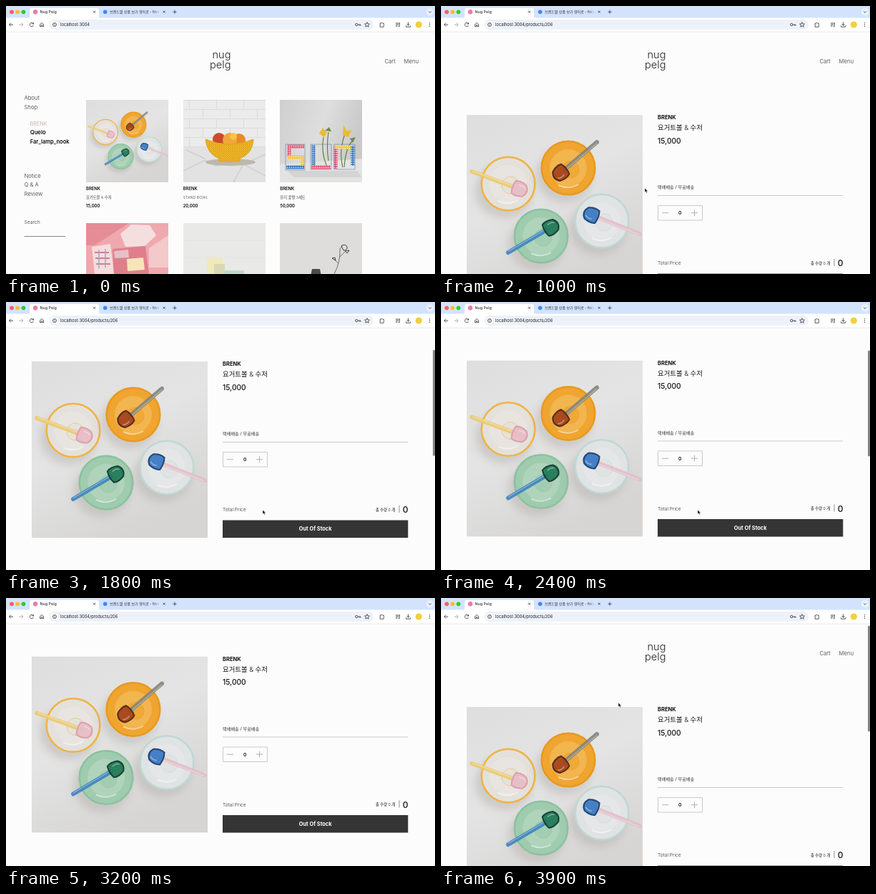
Animation of 600 by 374 pixels, one loop 4000 ms. Source, as an HTML page:

```html
<!DOCTYPE html>
<html lang="ko">
<head>
<meta charset="utf-8">
<style>
html, body { margin: 0; width: 100%; height: 100%; overflow: hidden; background: #fcfcfc; }
svg#stage { display: block; width: 600px; height: 374px; }
text { font-family: Inter, "Noto Sans CJK KR", "Noto Sans CJK", sans-serif; fill: #111; }
.logo { font-size: 14.6px; font-weight: 300; text-anchor: end; fill: #222; }
.nav { font-size: 7.7px; font-weight: 300; fill: #333; }
.b { font-weight: 600; }
.sub { font-size: 5.3px; font-weight: 300; fill: #444; }
.card { font-size: 5.9px; font-weight: 600; }
.icon * { fill: none; stroke: #444; stroke-width: .9; }
.icon .solid { fill: #444; stroke: none; }
.line { fill: none; stroke: #c4c4c4; stroke-width: .9; }
</style>
</head>
<body>
<svg id="stage" viewBox="0 0 600 374">
  <defs>
    <linearGradient id="paper" x1="0" y1="0" x2=".5" y2="1">
      <stop stop-color="#dededf"/><stop offset=".5" stop-color="#e4e4e4"/><stop offset="1" stop-color="#d6d5d4"/>
    </linearGradient>
    <linearGradient id="wall" x2="1" y2=".3">
      <stop stop-color="#cfcfcf"/><stop offset=".55" stop-color="#dedede"/><stop offset="1" stop-color="#c9c9c9"/>
    </linearGradient>
    <linearGradient id="fade">
      <stop offset=".88" stop-color="#d3e3fd" stop-opacity="0"/><stop offset="1" stop-color="#d3e3fd"/>
    </linearGradient>
    <pattern id="tiles" width="38" height="26" patternUnits="userSpaceOnUse">
      <path d="M0 .5h38M0 13.5h38M8.5 0v13M27.5 13v13" stroke="#d5d5d5" stroke-width=".7"/>
    </pattern>
    <pattern id="mesh" width="3" height="3" patternUnits="userSpaceOnUse">
      <path d="M0 0l3 3M3 0l-3 3" stroke="#d99b12" stroke-width=".7"/>
    </pattern>
    <pattern id="dots" width="3" height="3" patternUnits="userSpaceOnUse">
      <circle cx="1.5" cy="1.5" r=".8" fill="#f4f4f4"/>
    </pattern>
    <filter id="soft" x="-30%" y="-30%" width="160%" height="160%"><feGaussianBlur stdDeviation="6"/></filter>
    <clipPath id="square"><path d="M0 0h246v246H0z"/></clipPath>
    <clipPath id="tile"><path d="M0 0h115v115H0z"/></clipPath>
    <g id="bowls" clip-path="url(#square)"><path d="M0 0h246v246H0z" fill="url(#paper)"/></g>
  </defs>

  <rect width="600" height="374" fill="#fcfcfc"/>

  <g id="page">
    <text class="logo" x="314.5" y="72.5">nug</text>
    <text class="logo" x="314.5" y="86.5">pelg</text>
    <text class="nav" x="529.5" y="79.5">Cart</text>
    <text class="nav" x="556.5" y="79.5">Menu</text>

    <g id="home">
      <g class="nav">
        <text class="nav" x="25.5" y="131">About</text>
        <text class="nav" x="25.5" y="143.5">Shop</text>
        <text x="33.7" y="166.5" style="fill:#b3a19d;font-size:7.2px">BRENK</text>
        <text class="b" x="33.7" y="179">Quelo</text>
        <text class="b" x="33.7" y="191.7" style="font-size:7.5px">Far_lamp_nook</text>
        <text class="nav" x="25.5" y="239.7">Notice</text>
        <text class="nav" x="25.5" y="252.2">Q &amp; A</text>
        <text class="nav" x="25.5" y="265">Review</text>
        <text x="25.5" y="303.7" style="font-size:6.8px;fill:#333">Search</text>
      </g>
      <path d="M25.5 321.5H83" stroke="#888"/>
      <use href="#bowls" transform="translate(112 131) scale(.4675)"/>

      <g transform="translate(248 131)" clip-path="url(#tile)">
        <path d="M0 0h115v115H0z" fill="#ebebeb"/>
        <path d="M0 0h115v66H0z" fill="url(#tiles)"/>
        <path d="M0 66h115v49H0z" fill="#e2e2e2"/>
        <path d="M0 99l30-15 16 8 30-6 39 20M4 70l26 12M70 115l14-25 31-14" fill="none" stroke="#cdcdcd" stroke-width="1.4"/>
        <ellipse cx="66" cy="87" rx="35" ry="5" fill="#bcb8ae"/>
        <circle cx="50" cy="55" r="9" fill="#c94a2d"/>
        <circle cx="78" cy="56" r="9" fill="#e88a26"/>
        <circle cx="65" cy="56" r="10" fill="#f1a637"/>
        <circle cx="70" cy="51" r="5" fill="#f4c64c"/>
        <path id="basket" d="M31 55q34 14 67 0q-1 20-19 27v4H50v-4Q33 75 31 55z" fill="#f2bd2e" opacity=".9"/>
        <use href="#basket" style="fill:url(#mesh)"/>
        <path d="M31 55q34 14 67 0q-1 20-19 27v4H50v-4Q33 75 31 55z" fill="url(#mesh)" stroke="#dfa51c"/>
      </g>

      <g transform="translate(383 131)" clip-path="url(#tile)">
        <path d="M0 0h115v115H0z" fill="url(#wall)"/>
        <path d="M0 90l115-8v33H0z" fill="#e4e3e2"/>
        <path d="M10 99h98l7 9H20z" fill="#cbcbcd" opacity=".6"/>
        <g fill="none" stroke="#5d7a3e" stroke-width="1.1">
          <path d="M61 52q-4 20 5 42M68 45q-3 20 0 40M92 45q-10 25-4 49M101 58q-9 9-11 36"/>
        </g>
        <path d="M55 47l5-8 6 7-4 6zM89 35l4 8 7-1-4 10-8-3z" fill="#e9bd34"/>
        <path d="M63 43l6-5 3 6zM98 54l8-2-4 8z" fill="#728a4b"/>
        <g fill="none" stroke-width="5">
          <path d="M34 65H13v14" stroke="#ea5d7d"/>
          <path d="M11 80h21v16" stroke="#efc83d"/>
          <path d="M34 94H9" stroke="#3b7fc5"/>
          <path d="M47 63v30" stroke="#4c83c2"/><path d="M44 94h27" stroke="#ea5d72"/>
          <path d="M78 96V65" stroke="#e85474"/><path d="M76 66h26" stroke="#edc63e"/>
          <path d="M102 64v28" stroke="#3f7ec1"/>
          <path stroke="url(#dots)" d="M34 65H13v14M11 80h21v16M34 94H9M47 63v30M44 94h27M78 96V65M76 66h26M102 64v28"/>
        </g>
        <path d="M8 62h27v36H8zM43 62h29v35H43zM76 62h29v35H76z" fill="none" stroke="#446d9e" stroke-width=".5"/>
      </g>

      <g transform="translate(112 303)" clip-path="url(#tile)">
        <path d="M0 0h115v115H0z" fill="#efa9ae"/>
        <path d="M0 0h60L12 31H0z" fill="#e58d97"/>
        <path d="M48 15l15-13 26 1 9 14-16 15-27 1z" fill="#f5dfde"/>
        <path d="M88 35l27-18v45H88z" fill="#f3c9ca"/>
        <path d="M8 33l26-4 5 42H12z" fill="#f6dcdc"/>
        <path d="M37 36l46-4 5 39H39z" fill="#df7f8c"/>
        <path d="M39 39l20-2 1 11-20 1z" fill="#e6c0c8"/>
        <path d="M57 50l23-2 2 17-24 2z" fill="#f6e5ba"/>
        <path d="M12 41h20M13 49h20M14 57h20" stroke="#ce8090" stroke-width="2"/>
        <path d="M18 37v26M27 36v26" stroke="#98a9c4" stroke-width="1.5"/>
      </g>

      <g transform="translate(248 303)" clip-path="url(#tile)">
        <path d="M0 0h115v115H0z" fill="#e9e9e8"/>
        <path d="M0 24h115M0 48h115" stroke="#e3e3e2"/>
        <path d="M33 48h22v26H33z" fill="#eeeaba"/>
        <path d="M43 57h15v17H43z" fill="#d8d9b4"/>
        <path d="M58 66h27v8H58z" fill="#bfd8cb"/>
      </g>

      <g transform="translate(383 303)" clip-path="url(#tile)">
        <path d="M0 0h115v115H0z" fill="#dfdddb"/>
        <path d="M76 71q9-17 8-35M84 47l8-8M82 56l-7-6M84 36l4-5" fill="none" stroke="#555" stroke-width=".8"/>
        <path d="M86 32q5-4 8 1q1 5-5 5zM91 39l6-1-3 4zM73 49l4-1 1 4z" fill="none" stroke="#333" stroke-width=".9"/>
        <path d="M45 64h11l2 10H43z" fill="#4d4946"/>
      </g>
      <g id="labels"></g>
    </g>

    <g id="product">
      <use href="#bowls" x="36" y="152"/>
      <text x="303" y="158" style="font-size:7.5px;font-weight:700">BRENK</text>
      <text x="303" y="173.2" style="font-size:9.4px;font-weight:300">요거트볼 &amp; 수저</text>
      <text x="303" y="191.8" style="font-size:10.2px;font-weight:500">15,000</text>
      <text x="303" y="255.3" style="font-size:6.2px;fill:#333">택배배송 / 무료배송</text>
      <path class="line" d="M303 264.5h259M303.5 278.5h62v20.5h-62z"/>
      <path class="line" d="M309 288.7h9M350 288.7h9M354.5 284.2v9" style="stroke:#aaa"/>
      <text class="b" x="334.3" y="291" text-anchor="middle" style="font-size:6.6px">0</text>
      <text x="303" y="361" style="font-size:6.5px;fill:#555">Total Price</text>
      <text x="517" y="360.7" style="font-size:5.3px;font-weight:500">총 수량 <tspan font-weight="300">0</tspan> 개</text>
      <path d="M550 353v10" stroke="#777" stroke-width=".8"/>
      <text x="558.7" y="363.2" text-anchor="middle" style="font-size:12px;font-weight:500">0</text>
      <path d="M303 373.5h259.3V398H303z" fill="#353535"/>
      <text x="432.6" y="388.3" text-anchor="middle" style="font-size:7.4px;font-weight:700;fill:#fff">Out Of Stock</text>
    </g>
  </g>

  <rect id="thumb" x="597" width="3" height="148" rx="1.5" fill="#858585"/>

  <g id="browser">
    <path d="M0 0h600v17H0z" fill="#d3e3fd"/>
    <path d="M0 16.5h600V36H0z" fill="#fff"/>
    <path d="M0 36h600" stroke="#e3e6ea" stroke-width=".8"/>
    <circle cx="8" cy="8.3" r="2.9" fill="#fb5f57"/>
    <circle cx="16.2" cy="8.3" r="2.9" fill="#fdbc2e"/>
    <circle cx="24.4" cy="8.3" r="2.9" fill="#28c840"/>
    <path d="M30 17q3 0 3-3V6q0-3 3-3h91q3 0 3 3v8q0 3 3 3z" fill="#fff"/>
    <circle cx="41" cy="8.2" r="3.2" fill="#ea7ba5"/>
    <text x="47.5" y="10.2" style="font-size:5.4px">Nug Pelg</text>
    <circle cx="138.7" cy="8.2" r="2.8" fill="#4285f4"/>
    <text x="145" y="10.2" style="font-size:5px;fill:#333">브랜드별 상품 보기 영어로 - Nim</text>
    <path d="M145 3h70v11h-70z" fill="url(#fade)"/>
    <path d="M215 3h4v11h-4z" fill="#d3e3fd"/>
    <rect x="60.5" y="19" width="453.5" height="14" rx="7" fill="#edf1f9"/>
    <circle cx="68" cy="26" r="5.2" fill="#fff"/>
    <circle cx="593" cy="8.3" r="5.2" fill="#e9f0fe"/>
    <text id="address" x="76" y="28.1" style="font-size:5.8px;fill:#222"></text>
    <g class="icon">
      <path d="M122 6.7l3 3m0-3l-3 3M219.7 6.7l3 3m0-3l-3 3M233.5 8.3h5M236 5.8v5M591.2 7.5l1.8 1.8 1.8-1.8"/>
      <path d="M10 26H4.5m2.5-2.5L4.5 26l2.5 2.5"/>
      <path d="M18.5 26H24m-2.5-2.5L24 26l-2.5 2.5" style="stroke:#aaa"/>
      <path d="M38 24.5a2.6 2.6 0 1 0 .4 2.4M38.4 23v2h-2"/>
      <path d="M47.6 25.7v3.1h1.7v-2h1.6v2h1.7v-3.1l-2.5-2.2z"/>
      <circle cx="68" cy="26" r="2.5"/><path d="M68 25.6v1.8M68 24.2v.7"/>
      <circle cx="490.3" cy="26" r="1.7"/><path d="M492 26h4v1.7m-1.6-1.7v1.4"/>
      <path d="M505 22.7l1 2.2 2.4.2-1.8 1.6.5 2.4-2.1-1.3-2.1 1.3.5-2.4-1.8-1.6 2.4-.2z"/>
      <path d="M523.2 24.1h1.6q.9-2 1.8 0h1.6v1.6q1.8.8 0 1.6v1.9h-5z"/>
      <path d="M545 24h6M545 26h4M545 28h2.5M550.3 24v4.4h-1.6"/>
      <path d="M562.5 22.5v4.7m-2-2l2 2 2-2M559.5 27.4v1.8h6v-1.8"/>
      <circle class="solid" cx="592.5" cy="23.6" r=".7"/><circle class="solid" cx="592.5" cy="26" r=".7"/><circle class="solid" cx="592.5" cy="28.4" r=".7"/>
    </g>
    <circle cx="577.3" cy="26" r="4.6" fill="#f3cf3c"/>
  </g>

  <path id="cursor" d="M0 0v6l1.4-1.2 1 2.2 1.1-.5-1-2.1h1.9z" fill="#111" stroke="#fff" stroke-width=".5"/>
</svg>
<script>
const $ = id => document.getElementById(id);

// x, y, glass, centre, rim
const bowls = [
  [58, 96, '#e4e1dc', '#eae6e3', '#efb443'],
  [142, 74, '#efa52f', '#f3b958', '#e9991f'],
  [104, 169, '#9fcbae', '#b3d6be', '#8bc19f'],
  [189, 148, '#dfe3e3', '#e7e8ea', '#bfd8d2']
];
// handle tip x, y, head x, y, handle, head, outline
const spoons = [
  [7, 79, 75, 104, '#ecca72', '#e8bcc6', '#dc9bab'],
  [182, 38, 130, 82, '#85857a', '#a5431c', '#4a2418'],
  [58, 192, 119, 156, '#3d83bf', '#1f7a56', '#12352f'],
  [242, 166, 173, 139, '#e3bfc7', '#3a78c3', '#163a6b']
];

const drawBowl = ([x, y, glass, centre, rim]) => `
  <ellipse cx="${x - 6}" cy="${y + 11}" rx="40" ry="37" fill="#aaa69f" opacity=".4" filter="url(#soft)"/>
  <circle cx="${x}" cy="${y}" r="37.3" fill="${glass}" stroke="${rim}" stroke-width="2.6"/>
  <circle cx="${x}" cy="${y}" r="26" fill="${centre}" opacity=".8"/>
  <circle cx="${x + 3}" cy="${y + 2}" r="12" fill="${glass}" stroke="${rim}" stroke-width=".8" opacity=".7"/>
  <path d="M${x - 14} ${y + 24}q14 7 28-1" fill="none" stroke="#fff" stroke-width="2" opacity=".5"/>`;

const drawSpoon = ([x, y, hx, hy, handle, head, edge]) => {
  const angle = Math.atan2(hy - y, hx - x) * 180 / Math.PI;
  const reach = Math.hypot(hx - x, hy - y);
  return `<g transform="translate(${x} ${y}) rotate(${angle})">
    <path d="M0 0H${reach - 9}" stroke="${handle}" stroke-width="6" stroke-linecap="round" opacity=".9"/>
    <path d="M1 -1.2H${reach - 10}" stroke="#fff" stroke-width="1" opacity=".4"/>
    <path d="M${reach - 10} -9q-3 9 0 18q7 3 16-1q7-8 0-16q-9-4-16-1z" fill="${head}" stroke="${edge}" stroke-width="2" opacity=".93"/>
    <path d="M${reach - 4} -5q6-2 10 2" fill="none" stroke="#fff" stroke-width="1.5" opacity=".4"/>
  </g>`;
};
$('bowls').innerHTML += bowls.map(drawBowl).join('') + spoons.map(drawSpoon).join('');

$('labels').innerHTML = [
  [112, '요거트볼 &amp; 수저', '15,000'],
  [247.7, 'STAND BOWL', '20,000'],
  [383.3, '유리 꽃병 3세트', '50,000']
].map(([x, name, price]) => `
  <text class="card" x="${x}" y="257.3">BRENK</text>
  <text class="sub" x="${x}" y="269">${name}</text>
  <text class="card" x="${x}" y="281.4">${price}</text>`).join('');

// Linear interpolation over [time, ...values] rows
function at(rows, t) {
  const i = rows.findIndex(row => row[0] > t);
  if (i < 0) return rows[rows.length - 1].slice(1);
  if (!i) return rows[0].slice(1);
  const a = rows[i - 1], b = rows[i], k = (t - a[0]) / (b[0] - a[0]);
  return a.slice(1).map((v, j) => v + (b[j + 1] - v) * k);
}

const scrollPath = [[1500, 0], [1600, 5], [1700, 43], [1800, 69], [1900, 70.5],
  [3600, 70.5], [3700, 38], [3800, 8], [3900, 0]];
const cursorPath = [[300, 205, 262], [600, 178, 200], [800, 178, 200], [1000, 285, 254],
  [1200, 318, 274], [1500, 359, 290], [3700, 252, 152], [3900, 248, 146]];
const restPath = [[1500, 359, 290]];
const show = (id, on) => $(id).style.display = on ? '' : 'none';

function frame(now) {
  const t = Math.floor(now % 4000 / 100) * 100;
  const onProduct = t >= 800;
  const [scroll] = at(scrollPath, t);
  const [x, y] = at(t >= 1500 && t < 3600 ? restPath : cursorPath, t);

  show('home', !onProduct);
  show('product', onProduct);
  $('address').textContent = 'localhost:3004' + (onProduct ? '/products/206' : '');
  $('page').setAttribute('transform', `translate(0 ${-scroll})`);
  show('thumb', t >= 1500 && t < 2700 || t >= 3700);
  $('thumb').setAttribute('y', 38.5 + scroll * .41);
  show('cursor', t >= 300 && t < 2900 || t >= 3700);
  $('cursor').setAttribute('transform', `translate(${x} ${y})`);
  requestAnimationFrame(frame);
}
requestAnimationFrame(frame);
</script>
</body>
</html>
```
